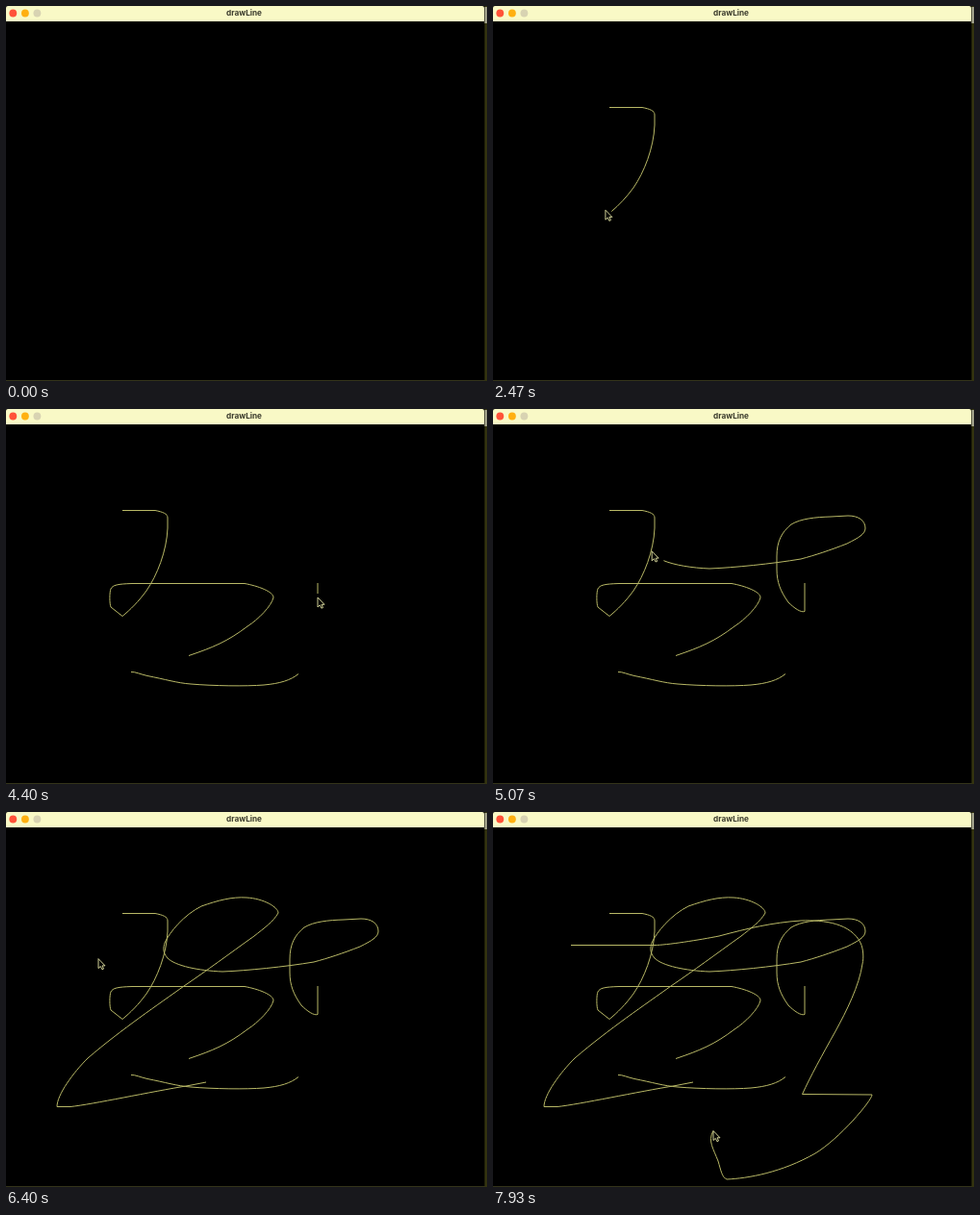
These frames come from a looping animation (500 px wide and 390 px high, 8 s). An HTML page:

```html
<!DOCTYPE html>
<html lang="en">
<head>
<meta charset="utf-8">
<title>drawLine</title>
<style>
  html, body { margin: 0; width: 100%; height: 100%; overflow: hidden; background: #000; }
  svg { display: block; width: 500px; height: 390px; }
  #ink path { fill: none; stroke: #b8b866; stroke-width: 1; stroke-linejoin: round; }
  #cursor { fill: #000; stroke: #e6e6a6; stroke-width: .9; stroke-linejoin: round; }
  text { font: 700 8.2px Inter, "Open Sans", sans-serif; fill: #3a3a2c; text-anchor: middle; }
</style>
</head>
<body>
<svg viewBox="0 0 500 390">
  <rect width="500" height="390"/>
  <rect x="497.5" width="2.5" height="390" fill="#34340f"/>
  <rect x="497.5" y="1" width="2.5" height="17" fill="#a3a38c"/>
  <rect y="389" width="498" height="1" fill="#34341a"/>
  <path d="M0 16V2Q0 0 2 0H495Q497 0 497 2V16Z" fill="#f9f9c6"/>
  <circle cx="7.3" cy="7.5" r="3.9" fill="#ff5238"/>
  <circle cx="19.9" cy="7.5" r="3.9" fill="#ffb010"/>
  <circle cx="32.4" cy="7.5" r="3.9" fill="#d8d3b2"/>
  <text x="247.5" y="10">drawLine</text>
  <g id="ink"></g>
  <path id="cursor" d="M0 0V10L2.3 7.9L3.9 11.2L5.5 10.5L4 7.3H7Z"/>
</svg>
<script>
const LOOP = 8000, STEP = 1000 / 15, LEAD = 25;
const ink = document.getElementById('ink');
const cursor = document.getElementById('cursor');

const linear = p => p;
const ease = p => p * p * (3 - 2 * p);
const easeOut = p => 1 - (1 - p) ** 2;

function leg(start, end, d, curve, drawn) {
  const path = document.createElementNS('http://www.w3.org/2000/svg', 'path');
  path.setAttribute('d', d);
  const len = path.getTotalLength();
  if (drawn) ink.append(path);
  return { start, end, path, len, curve, drawn };
}
const draw = (start, end, d) => leg(start, end, d, linear, true);
const move = (start, end, d, curve = ease) => leg(start, end, d, curve, false);

const legs = [
  move(800, 1480, 'M500 292C400 250 220 160 119.5 105', easeOut),
  move(1700, 1800, 'M119.5 105L121 105.5'),
  draw(1780, 2480, `M121 105.5H155C163 107 168 109 168 113V124C167 148 157 173 146 189
    C138 200 129 209 121 215.5`),
  draw(2480, 3195, `M121 215.5L109 206C107.5 203 107.5 190 109 187C111 183 116 182 131 181.5
    H248C262 184 278 190 278 196C276 205 262 219 251 226C230 242 215 248 190 256.5`),
  move(3370, 3425, 'M190 256.5L168.5 255.5', linear),
  move(3425, 3570, 'M168.5 255.5C152 256 138 264 130 273.5'),
  draw(3590, 4130, `M130 273.5C134 273 140 276 147 277.5C165 281 178 285 192 286
    C215 288 250 288.5 268 287C285 285.5 296 282 304 275.5`),
  move(4130, 4330, 'M304 275.5C318 258 324 215 324 181'),
  draw(4330, 4425, 'M324 181V196'),
  draw(4425, 5800, `M324 196V210.5C320 212 313 207 307 201C299 190 295 180 295 167V153
    C295 138 300 128 310 120C320 114 335 112.5 351 112L369 111C380 111 387 116 387 124
    C387 130 380 134 368 140C350 147 335 152 320 156C290 161 250 165 225 166
    C200 165 176 160 168 152C162 145 164 140 165 136C170 125 185 107 203 98
    C220 92 235 88 250 89C268 90 283 99 283 105C278 114 268 121 258 129
    C230 149 210 164 185 181C160 199 120 226 85 256C70 271 53 294 53 306.5H62`),
  draw(5800, 5935, 'M62 306.5H67C90 304 150 291 190 284.5L208 281'),
  move(5975, 6540, 'M208 281C190 240 120 175 81 138.5'),
  draw(6620, 7000, `M81 138.5H168C180 138.5 215 133 235 129C265 121 290 115 320 113
    C345 112 372 116 382 136`),
  draw(7000, 7935, `M382 136C385 142 385.5 152 384 158C381 180 367 208 356 228
    C342 253 330 275 321.5 293.5L394 294C394 300 360 340 335 355
    C300 375 265 381 243 382C238 380 237 373 234 363C229 350 223 342 229 331.5`)
];

const progress = (l, t) => l.curve(Math.min(1, Math.max(0, (t - l.start) / (l.end - l.start))));

function render(t) {
  for (const l of legs) {
    if (!l.drawn) continue;
    const shown = progress(l, t) * l.len;
    l.path.style.visibility = shown > 0 ? 'visible' : 'hidden';
    l.path.style.strokeDasharray = shown < l.len ? `${shown} 5000` : 'none';
  }
  // The pointer runs slightly ahead of the ink.
  const ahead = t + LEAD;
  const now = legs.filter(l => l.start <= ahead).pop();
  cursor.style.visibility = now ? 'visible' : 'hidden';
  if (now) {
    const p = now.path.getPointAtLength(progress(now, ahead) * now.len);
    cursor.setAttribute('transform', `translate(${p.x} ${p.y})`);
  }
}

const begin = performance.now();
function tick() {
  const t = (performance.now() - begin) % LOOP;
  render(Math.floor((t + 4) / STEP) % 120 * STEP);
  requestAnimationFrame(tick);
}
tick();
</script>
</body>
</html>
```
